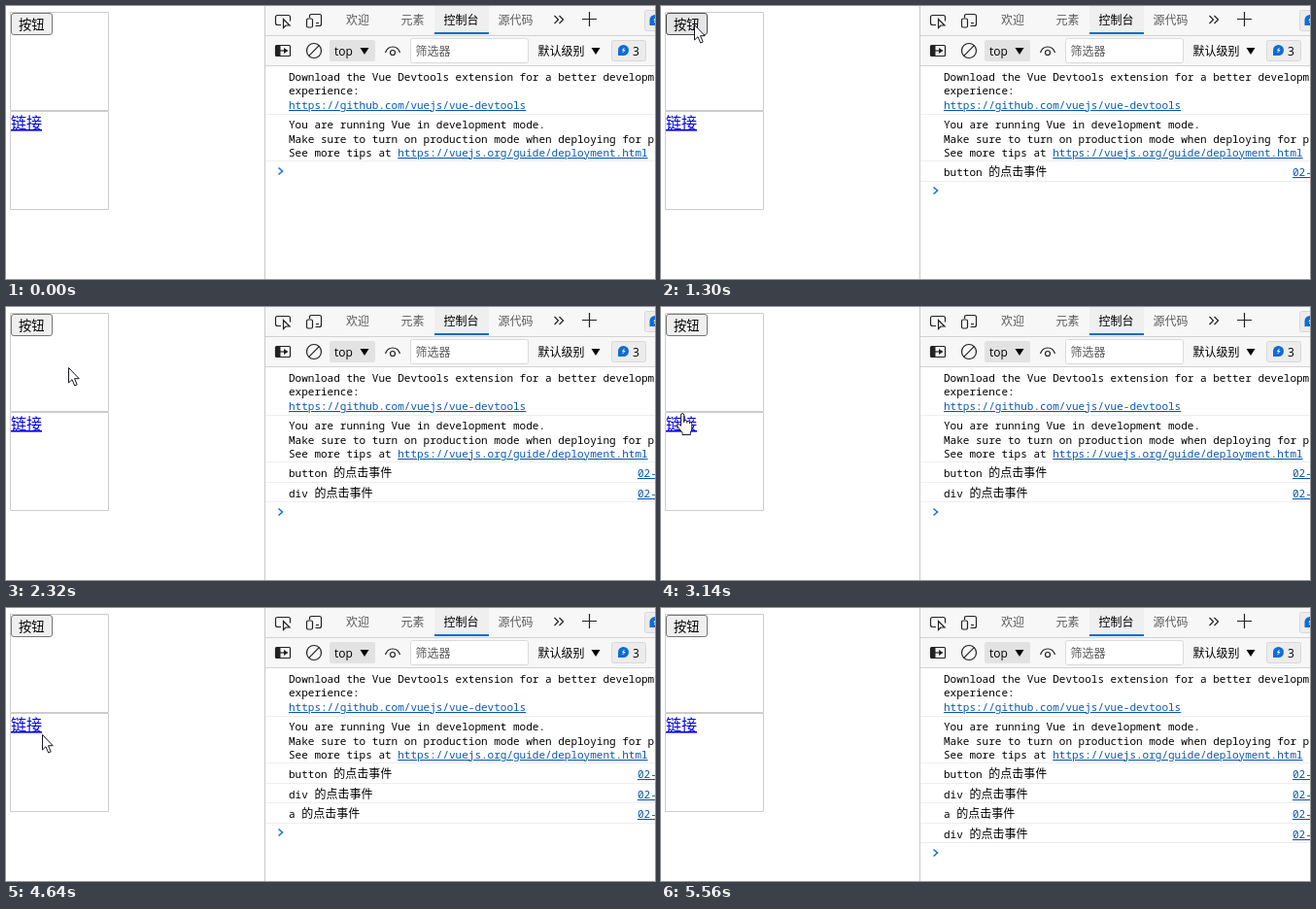
These frames come from a looping animation (668 px wide and 281 px high, 6160 ms). An HTML page:

```html
<!DOCTYPE html>
<html lang="zh-CN">
<head>
<meta charset="utf-8">
<title>Click events</title>
<style>
  html, body { margin: 0; width: 100%; height: 100%; overflow: hidden; background: #fff; }
  svg { display: block; }
  text { white-space: pre; }
  .ui { font: 12px "Open Sans", "Noto Sans CJK SC", "Noto Sans CJK", sans-serif; fill: #000; }
  .dim { fill: #5c5c5c; }
  .mono { font: 11px "Noto Sans Mono", monospace; fill: #000; }
  .cjk { font: 12px "Noto Sans CJK SC", "Noto Sans CJK", sans-serif; }
  .link { fill: #0b57b0; text-decoration: underline; }
  .page { font-family: "Noto Sans CJK SC", "Noto Sans CJK", sans-serif; }
  .icon { fill: none; stroke: #222; stroke-width: 1.2; }
  .rule { stroke: #eee; }
  .btn { fill: #efefef; stroke: #767676; }
  .cursor path { fill: #fff; stroke: #16161f; stroke-linejoin: round; }

  .btn, .tail, .arrow, .hand { animation: 6160ms step-end infinite; }
  .btn { animation-name: press; }
  .tail { animation-name: log; }
  .arrow { animation-name: arrow; }
  .hand { animation-name: hand; }

  @keyframes press {
    0% { fill: #efefef; stroke: #767676; }
    9.73% { fill: #e5e5e5; stroke: #4a4a4a; }
    17.85% { fill: #f5f5f5; stroke: #8d8d8d; }
    19.47% { fill: #e5e5e5; stroke: #4a4a4a; }
    26.29%, 100% { fill: #efefef; stroke: #767676; }
  }
  @keyframes log {
    0% { transform: none; }
    19.47% { transform: translateY(20px); }
    36.03% { transform: translateY(41px); }
    67.2% { transform: translateY(61px); }
    85.06%, 100% { transform: translateY(82px); }
  }
  @keyframes arrow {
    0% { transform: translate(-50px, 0); }
    3.24% { transform: translate(362px, 261px); }
    4.86% { transform: translate(240px, 180px); }
    6.49% { transform: translate(142px, 106px); }
    8.11% { transform: translate(76px, 54px); }
    9.73% { transform: translate(39px, 26px); }
    11.36% { transform: translate(34px, 20px); }
    26.29% { transform: translate(40px, 30px); }
    27.92% { transform: translate(51px, 45px); }
    29.54% { transform: translate(60px, 57px); }
    31.16% { transform: translate(64px, 63px); }
    50.97% { transform: translate(-50px, 0); }
    75.32% { transform: translate(37px, 131px); }
    76.94% { transform: translate(48px, 138px); }
    78.57% { transform: translate(55px, 143px); }
    80.19% { transform: translate(57px, 144px); }
    86.68% { transform: translate(66px, 186px); }
    88.31% { transform: translate(80px, 250px); }
    90.25%, 100% { transform: translate(-50px, 0); }
  }
  @keyframes hand {
    0% { transform: translate(-50px, 0); }
    50.97% { transform: translate(16px, 109px); }
    52.59% { transform: translate(6px, 114px); }
    54.22% { transform: translate(0, 117px); }
    55.84% { transform: translate(3px, 119px); }
    57.46% { transform: translate(7px, 120px); }
    59.09% { transform: translate(9px, 121px); }
    75.32%, 100% { transform: translate(-50px, 0); }
  }
</style>
</head>
<body>
<svg width="668" height="281" viewBox="0 0 668 281">
  <defs>
    <g id="bubble">
      <path d="M-5.5 5V-.5A5.500 5.500 0 1 1 0 5Z" fill="#0f6cd4"/>
      <path d="M1-3l-2 2.500h2.500l-2.500 2.500" fill="none" stroke="#fff" stroke-width=".9"/>
    </g>
    <path id="down" d="M0 0h9l-4.500 7z" fill="#000"/>
  </defs>

  <g class="page">
    <path d="M4.500 6.500h101v101H4.500zM4.500 108.500h101v101H4.500z" fill="none" stroke="#ccc"/>
    <rect class="btn" x="5.500" y="7.500" width="42" height="22" rx="2.500"/>
    <text x="13" y="24" font-size="13.33">按钮</text>
    <text x="5" y="126" font-size="16" fill="#00e" text-decoration="underline">链接</text>
  </g>

  <rect x="267" width="401" height="62" fill="#f7f7f7"/>
  <rect x="441" width="56" height="30" fill="#efefef"/>
  <path d="M267 30.500h401M267 61.500h401" stroke="#d2d2d2"/>
  <path d="M266.500 0v281" stroke="#c8c8c8"/>
  <rect x="441" y="27" width="56" height="2" fill="#0f6cc4"/>

  <g class="icon">
    <path d="M283 19.500h-3.500q-2 0-2-2v-6q0-2 2-2h11q2 0 2 2v4M285.500 13.500v9l2.500-2.500h4z"/>
    <path d="M312.500 12v-1.500q0-2 2-2h8q2 0 2 2v8q0 2-2 2h-4M309.500 14.500q0-1.500 1.500-1.500h3q1.500 0 1.500 1.500v6q0 1.500-1.500 1.500h-3q-1.500 0-1.500-1.500zM319 17.500h3"/>
    <path d="M564.500 10l4 4-4 4M569.500 10l4 4-4 4M593 13.500h15M600.500 6v15"/>
    <rect x="277.500" y="40.500" width="15" height="11" rx="1"/>
    <path d="M278 41h4.500v10H278zM286 43l4.500 3-4.500 3z" fill="#222" stroke="none"/>
    <path d="M282 46h5"/>
    <circle cx="317" cy="46" r="7.500"/>
    <path d="M311.700 51.300l10.600-10.600M390.500 48q2-6 7.500-6t7.500 6"/>
    <circle cx="398" cy="48" r="2.500"/>
  </g>

  <g class="ui">
    <g class="dim">
      <text x="350" y="19">欢迎</text>
      <text x="406.500" y="19">元素</text>
      <text x="506.500" y="19">源代码</text>
    </g>
    <text x="450.500" y="19">控制台</text>
    <rect x="657.500" y="4.500" width="30" height="21" rx="2" fill="#ececec" stroke="#d8d8d8"/>
    <use href="#bubble" x="668" y="15"/>

    <rect x="333" y="35" width="47" height="22" rx="2" fill="#e2e2e2"/>
    <text x="338" y="51">top</text>
    <use href="#down" x="364.500" y="43"/>
    <rect x="416.500" y="33.500" width="121" height="25" rx="2" fill="#fff" stroke="#dadada"/>
    <text class="dim" x="421.500" y="51">筛选器</text>
    <text x="547.500" y="51">默认级别</text>
    <use href="#down" x="602.500" y="43"/>
    <rect x="623.500" y="35.500" width="35" height="21" rx="2" fill="#ececec" stroke="#d8d8d8"/>
    <use href="#bubble" x="635.500" y="46"/>
    <text x="645" y="50.500">3</text>
  </g>

  <g class="mono">
    <text x="291" y="77">Download the Vue Devtools extension for a better development</text>
    <text x="291" y="91">experience:</text>
    <text x="291" y="106" class="link">https://github.com/vuejs/vue-devtools</text>
    <text x="291" y="126">You are running Vue in development mode.</text>
    <text x="291" y="141">Make sure to turn on production mode when deploying for production.</text>
    <text x="291" y="155">See more tips at <tspan class="link">https://vuejs.org/guide/deployment.html</tspan></text>
    <path class="rule" d="M267 111.500h401M267 159.500h401"/>
    <g id="rows"></g>
  </g>

  <g class="tail">
    <rect x="267" y="161" width="401" height="120" fill="#fff"/>
    <path d="M280.500 166.500l4 3.500-4 3.500" fill="none" stroke="#1a73d0" stroke-width="1.600"/>
  </g>

  <g class="cursor">
    <path class="arrow" d="M.5-.5v15.500l3.500-3.300 2.700 6.300 2.500-1.100-2.700-6.200h4.700z"/>
    <path class="hand" d="M4.500 13V2.200a1.600 1.600 0 0 1 3.200 0V8q2.600-1 3 .6 2.400-.8 2.800.8 2.300-.3 2.300 2V16q0 2-1.500 4v2.500H6v-2L1 14q-1-2 .8-2.500 1.200 0 2.700 1.800zM7.700 8v2M10.700 8.600V10.500M13.500 9.400V11"/>
  </g>
</svg>
<script>
  // Log rows sit still; the moving tail uncovers them one by one.
  const row = (tag, i) => {
    const y = 175 + Math.round(i * 20.5);
    const rule = 180.5 + Math.floor(i * 20.5);
    return `<text x="291" y="${y}">${tag} <tspan class="cjk">的点击事件</tspan></text>
      <text class="link" x="650" y="${y}">02-事件</text>
      <path class="rule" d="M267 ${rule}h401"/>`;
  };
  document.getElementById('rows').innerHTML = ['button', 'div', 'a', 'div'].map(row).join('');
</script>
</body>
</html>
```
